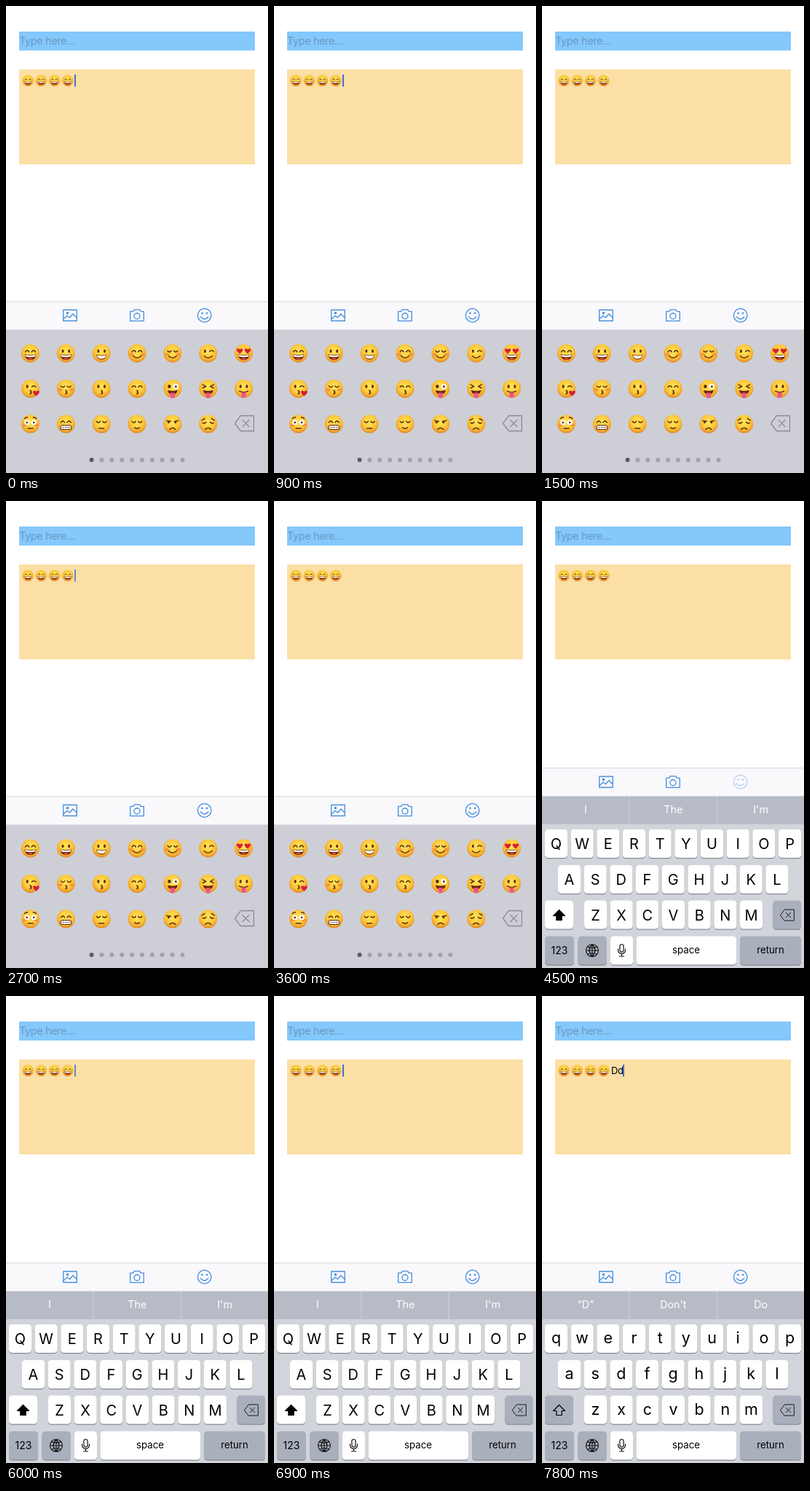
Recreate the animation shown at these times as an HTML page. Size 360 by 640 pixels, loop 8000 ms.

```html
<!DOCTYPE html>
<html lang="en">
<head>
<meta charset="utf-8">
<title>Keyboard switch</title>
<style>
html, body { margin: 0; width: 100%; height: 100%; overflow: hidden; background: #fff; }
svg { display: block; width: 100vw; height: 100vh; }
text { font-family: Inter, "Open Sans", sans-serif; }
.mid { text-anchor: middle; }
.line { fill: none; stroke-linecap: round; stroke-linejoin: round; }
.ink { stroke: #5c300d; stroke-width: 1.5; }
.bar { stroke: #448ee0; stroke-width: 1.3; }
.bar .dot { fill: #448ee0; stroke: none; }

#faces, #keys, #bar, #smile, .upper, .lower, #d1, #d2, #caret, #blink {
  animation: 8s step-end infinite;
}
#faces { animation-name: before; }
#keys { animation-name: after; }
#bar { animation-name: lift; }
#smile { animation-name: press; }
.upper { animation-name: caps; }
.lower, #d1 { animation-name: small; }
#d2 { animation-name: last; }
#caret { animation-name: advance; }
#blink { animation-name: blink; }

@keyframes before { 0% { visibility: visible } 56.25%, 100% { visibility: hidden } }
@keyframes after { 0% { opacity: 0 } 56.25%, 100% { opacity: 1 } }
@keyframes lift { 0% { transform: none } 56.25%, 100% { transform: translateY(-39px) } }
@keyframes press { 0%, 60%, 100% { opacity: 1 } 52.5% { opacity: .2 } 56.25% { opacity: .36 } }
@keyframes caps { 0% { opacity: 1 } 90%, 100% { opacity: 0 } }
@keyframes small { 0% { opacity: 0 } 90%, 100% { opacity: 1 } }
@keyframes last { 0% { opacity: 0 } 97.5%, 100% { opacity: 1 } }
@keyframes advance {
  0% { transform: none }
  90% { transform: translateX(9px) }
  97.5%, 100% { transform: translateX(17px) }
}
@keyframes blink {
  0%, 11.25%, 22.5%, 36%, 48.75%, 60%, 86.25%, 100% { opacity: 1 }
  33.75%, 71.25% { opacity: .8 }
  3.75%, 15%, 30%, 41.25%, 52.5%, 67.5%, 82.5% { opacity: 0 }
}
</style>
</head>
<body>
<svg id="stage" viewBox="0 0 360 640" preserveAspectRatio="none"></svg>
<script>
const rect = (x, y, w, h, fill, r = 0) =>
  `<rect x="${x}" y="${y}" width="${w}" height="${h}" rx="${r}" fill="${fill}"/>`;
const dot = (x, y, rx, fill, ry = rx, extra = '') =>
  `<ellipse cx="${x}" cy="${y}" rx="${rx}" ry="${ry}" fill="${fill}" ${extra}/>`;
const label = (x, y, size, str, fill = '#000', cls = 'mid') =>
  `<text x="${x}" y="${y}" font-size="${size}" fill="${fill}" class="${cls}">${str}</text>`;
const fillPath = (d, fill) => `<path d="${d}" fill="${fill}"/>`;
const stroke = d => `<path class="line ink" d="${d}"/>`;
const at = (x, y, body, scale = 1) =>
  `<g transform="translate(${x} ${y}) scale(${scale})">${body}</g>`;

// Face parts, drawn around 0,0 with a head radius of 12.5
const INK = '#5c300d';
const heart = (x, y, s) =>
  at(x, y, fillPath('M0 4C-7-1-4-5 0-2C4-5 7-1 0 4Z', '#d91f36'), s);
const oval = (x, y = -3) => dot(x, y, 1.5, INK, 2.3);
const both = f => f(-4.3) + f(4.3);
const tongue = (x, y) =>
  fillPath(`M${x - 3} ${y}h6v4.5a3 3.2 0 0 1-6 0Z`, '#f0568c') +
  `<path d="M${x} ${y}v3.5" stroke="#c93669" stroke-width=".8"/>`;
const blush = both(x => dot(x * 1.8, 1.5, 2.8, '#f2703c', 2, 'opacity=".6"'));

const eyes = {
  arch: both(x => stroke(`M${x - 2.6}-2q2.6-4 5.2 0`)),
  shut: both(x => stroke(`M${x - 2.6}-3.5q2.6 3.4 5.2 0`)),
  open: both(x => oval(x)),
  wink: oval(-4.3) + stroke('M2-2.5q2.6-3 5.5 0'),
  hearts: both(x => heart(x * 1.25, -3.5, 1)),
  squint: stroke('M-7.5-5.5l4.7 2.4l-4.7 2.2M7.5-5.5l-4.7 2.4l4.7 2.2'),
  big: both(x => dot(x * 1.1, -2, 3.5, '#fff') + dot(x * 1.1, -2, 1.4, INK)) +
    stroke('M-8-7.5q2-2 4-1.5M8-7.5q-2-2-4-1.5'),
  crazy: dot(-4.5, -3, 2.3, INK) + stroke('M2-2.5q2.6-3 5.5 0') +
    dot(4.5, -3, 3.6, '#fff') + dot(4.5, -3, 1.5, INK),
  side: stroke('M-8-4.5l5.5 1M2.5-3.5l5.5-1') + dot(-5.5, -2.4, 1.5, INK) + dot(4, -2.4, 1.5, INK),
  sad: stroke('M-7.5-1.5q2.6 1.5 4.8-1M7.5-1.5q-2.6 1.5-4.8-1') +
    stroke('M-8.5-5l4-2.5M8.5-5l-4-2.5')
};
const kiss = stroke('M-.5 2.6q3 .6 .8 2.3q2.8 .9-.8 2.3');
const mouths = {
  laugh: fillPath('M-8 1.2Q0 3.4 8 1.2Q7 9.3 0 9.3T-8 1.2Z', '#6b260e') +
    fillPath('M-7.2 2Q0 4 7.2 2L6.5 4.6Q0 6-6.5 4.6Z', '#fff') + dot(0, 7.5, 3.2, '#d84a3a', 1.3),
  grin: fillPath('M-7.5 1.5Q0 3.5 7.5 1.5Q6 8.8 0 8.8T-7.5 1.5Z', '#8a4c18') +
    fillPath('M-6.5 2.5Q0 4.3 6.5 2.5Q5.2 7.2 0 7.2T-6.5 2.5Z', '#fff'),
  teeth: rect(-8, 1.2, 16, 7, INK, 3.5) + rect(-7, 2.2, 14, 5, '#fff', 2.4) +
    '<path d="M-7 4.7h14M-3.5 2.3v4.8M0 2.3v4.8M3.5 2.3v4.8" stroke="#8b6a50" stroke-width=".6"/>',
  smile: stroke('M-5.5 3.5Q0 9 5.5 3.5'),
  soft: stroke('M-3.5 5Q0 7.5 3.5 5'),
  flat: stroke('M-3.5 6h7'),
  frown: stroke('M-4 7.5Q0 3.5 4 7.5'),
  kiss,
  love: kiss + heart(8, 6, 1.05),
  lick: fillPath('M-7 2Q0 4 7 2Q6 8 0 8T-7 2Z', '#6b260e') + tongue(0, 5.5),
  poke: stroke('M-6 3.5Q0 6.5 6 3.5') + tongue(0, 5)
};
const face = (eye, mouth, rosy) =>
  dot(0, 0, 12.5, 'url(#skin)') + (rosy ? blush : '') + eyes[eye] + mouths[mouth];

const moods = [
  ['arch', 'laugh'], ['open', 'laugh'], ['open', 'grin'], ['arch', 'smile', 1],
  ['shut', 'smile', 1], ['wink', 'smile'], ['hearts', 'laugh'],
  ['wink', 'love'], ['shut', 'kiss', 1], ['open', 'kiss'], ['arch', 'kiss'],
  ['crazy', 'lick'], ['squint', 'lick'], ['open', 'poke'],
  ['big', 'flat', 1], ['arch', 'teeth'], ['shut', 'flat'], ['shut', 'soft'],
  ['side', 'frown'], ['sad', 'frown']
];

const erase = (x, y, s, color) => at(x, y,
  `<path class="line" stroke="${color}" stroke-width="1.3"
    d="M-13 0L-5-10.5H13V10.5H-5ZM-2.5-4.5l9 9m0-9l-9 9"/>`, s);

function facePad() {
  let out = rect(0, 443, 360, 197, '#cecfd6');
  moods.forEach((m, i) => {
    out += at(33.5 + 48.85 * (i % 7), 476 + 48.4 * Math.floor(i / 7), face(...m));
  });
  out += erase(327.5, 572, 1, '#8c8c92');
  for (let i = 0; i < 10; i++) out += dot(117.6 + 13.87 * i, 622, 3, i ? '#a1a2a8' : '#5c5d62');
  return out;
}

const DARK = '#a9b0bc';
const key = (x, y, w, fill = '#fff') =>
  rect(x, y + 1.2, w, 39, '#888b92', 4.5) + rect(x, y, w, 39, fill, 4.5);

function letters() {
  const rows = [['QWERTYUIOP', 4, 450], ['ASDFGHJKL', 22, 499], ['ZXCVBNM', 58, 547.5]];
  let caps = '', up = '', low = '';
  for (const [row, left, y] of rows) {
    [...row].forEach((c, i) => {
      const x = left + 35.67 * i;
      caps += key(x, y, 31);
      up += label(x + 15.5, y + 27, 20, c);
      low += label(x + 15.5, y + 26, 21.5, c.toLowerCase());
    });
  }
  const arrow = fill => `<path class="line" style="fill:${fill}" stroke="#000" stroke-width="1.2"
    d="M23.500 560.500l-8 8h4.300v6h7.400v-6h4.300Z"/>`;
  return caps +
    `<g class="upper">${up}${key(4, 547.5, 39)}${arrow('#000')}</g>` +
    `<g class="lower">${low}${key(4, 547.5, 39, DARK)}${arrow('none')}</g>`;
}

const words = (list, cls) => `<g class="${cls}">` +
  list.map((w, i) => label(60 + 120.3 * i, 427.5, 14.3, w, '#fff')).join('') + '</g>';

const globe = at(69, 616,
  `<path class="line" stroke="#111" stroke-width="1.1" d="M-8.500 0a8.500 8.500 0 1 0 17 0a8.500 8.500 0 1 0-17 0
    M-8.500 0H8.500M0-8.500V8.500M-6.500-5Q0-2 6.500-5M-6.500 5Q0 2 6.500 5
    M0-8.500Q-8 0 0 8.500Q8 0 0-8.500"/>`);
const mic = at(109.5, 616,
  rect(-2.6, -8.5, 5.2, 11, '#fff', 2.6) +
  `<path class="line" stroke="#111" stroke-width="1.2" d="M-2.600-5.900a2.600 2.600 0 0 1 5.200 0v5.500a2.600 2.600 0 0 1-5.200 0Z
    M-5-2v1.500a5 5 0 0 0 10 0V-2M0 4.600V8M-3 8h6"/>`);

function letterPad() {
  return rect(0, 404, 360, 39, '#b7bbc6') + rect(0, 443, 360, 197, '#d1d4da') +
    rect(119.5, 404, 1, 39, '#cdd0d8') + rect(240, 404, 1, 39, '#cdd0d8') +
    words(['I', 'The', "I'm"], 'upper') + words(['“D”', "Don't", 'Do'], 'lower') +
    letters() +
    key(317.5, 547.5, 38.5, DARK) + erase(337, 567.5, .72, '#111') +
    key(4, 596.5, 40, DARK) + label(24, 620.5, 14, '123') +
    key(49.5, 596.5, 39.5, DARK) + globe +
    key(94, 596.5, 31, '#fff') + mic +
    key(129.5, 596.5, 137.5) + label(198, 619.5, 13.3, 'space') +
    key(272, 596.5, 84, DARK) + label(314, 619.5, 13.2, 'return');
}

function toolbar() {
  const round = (x, y, r) => `<circle cx="${x}" cy="${y}" r="${r}"/>`;
  return rect(0, 404.5, 360, 39, '#f9f8fb') + rect(0, 404.5, 360, 1, '#d6d6da') +
    `<g class="line bar">
      <path d="M78.700 416.500h18.600v15h-18.600ZM79 429l5-4.500l3.500 2.500l4.500-5l5 5"/>
      <circle class="dot" cx="84.500" cy="420.800" r="1.800"/>
      <path d="M170.700 418.700h4l1.500-2.500h7.600l1.500 2.500h4v13h-18.600Z"/>${round(180, 425, 4)}
      <g id="smile">${round(272.7, 424, 9.3)}
        <path d="M267.500 426q5.200 6 10.400 0"/>
        <circle class="dot" cx="269.500" cy="421" r="1.300"/>
        <circle class="dot" cx="276" cy="421" r="1.300"/>
      </g>
    </g>`;
}

function fields() {
  let out = rect(18, 35, 324, 26, '#84c8fc') +
    `<text x="18" y="53" font-size="14.5" letter-spacing="-.4" fill="#6799c2">Type here...</text>` +
    rect(18, 87, 324, 130, '#fbdfa4');
  for (let i = 0; i < 4; i++) out += at(30.2 + 18.2 * i, 102.2, face('arch', 'laugh'), .62);
  return out +
    `<g id="d1">${label(95, 107, 13, 'D', '#000', '')}</g>` +
    `<g id="d2">${label(104, 107, 13, 'd', '#000', '')}</g>` +
    `<g id="caret"><g id="blink">${rect(94, 94, 2, 16.5, '#4470d6')}</g></g>`;
}

document.getElementById('stage').innerHTML =
  `<defs><radialGradient id="skin" cx=".5" cy=".4" r=".62">
    <stop offset="0" stop-color="#ffe45c"/><stop offset=".55" stop-color="#fdcb3c"/>
    <stop offset=".85" stop-color="#f0a02c"/><stop offset="1" stop-color="#d17a20"/>
  </radialGradient></defs>` +
  fields() +
  `<g id="faces">${facePad()}</g><g id="keys">${letterPad()}</g><g id="bar">${toolbar()}</g>`;
</script>
</body>
</html>
```
